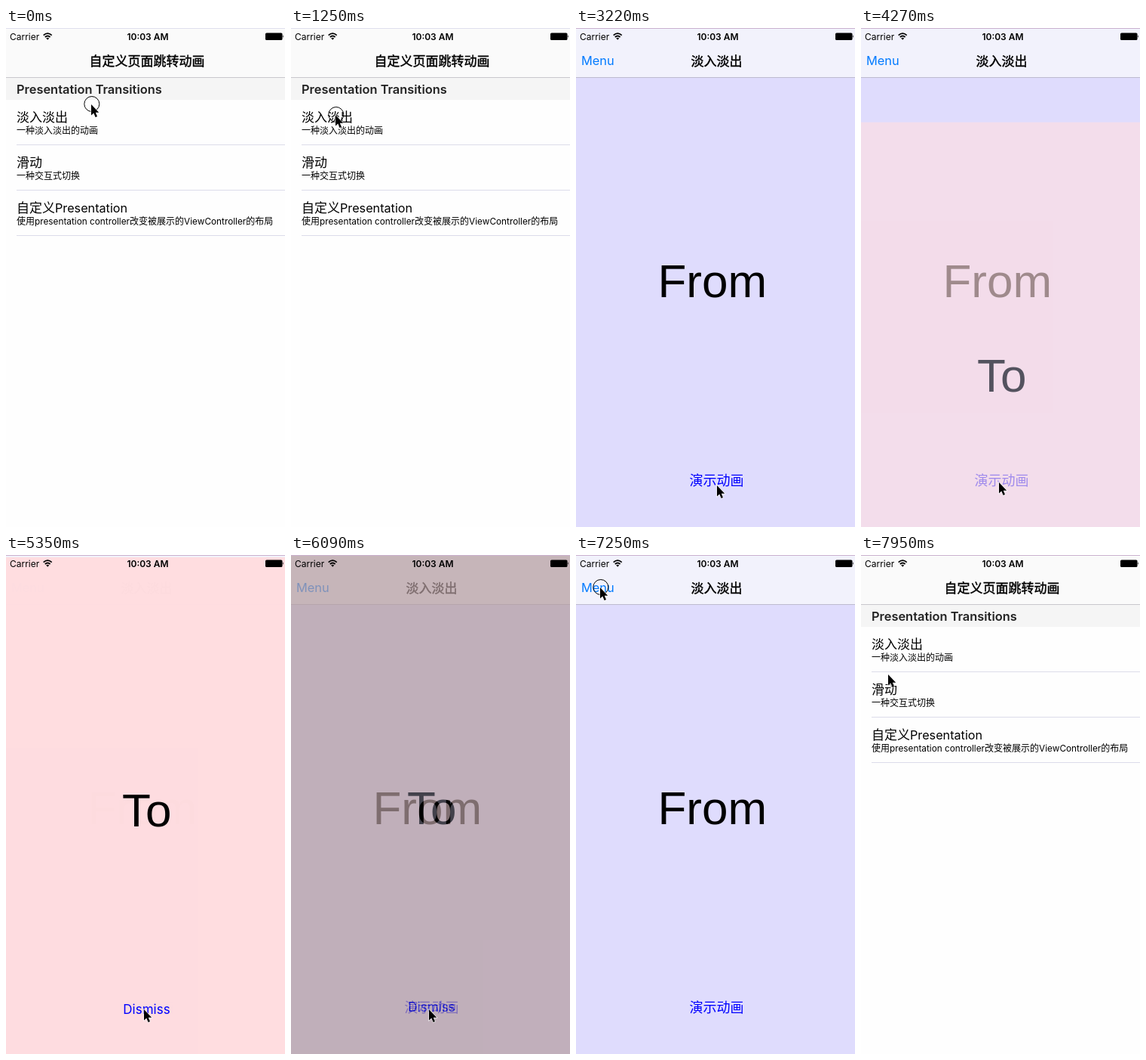
Write an HTML page that moves like this. It is 370 by 660 pixels and loops after 8000 ms.

```html
<!DOCTYPE html>
<html lang="zh-CN">
<head>
<meta charset="utf-8">
<title>自定义页面跳转动画</title>
<style>
  html, body { margin: 0; width: 100%; height: 100%; overflow: hidden; background: #fefefe; }
  svg { display: block; width: 100vw; height: 100vh; }
  text { font-family: Inter, "Noto Sans CJK SC", "Noto Sans CJK", sans-serif; white-space: pre; }
  .title { font-size: 17px; text-anchor: middle; stroke: #000; stroke-width: .45px; }
  .head { font-size: 16.4px; font-weight: 600; fill: #222; }
  .row { font-size: 17px; }
  .row tspan { font-size: 16.2px; }
  .sub { font-size: 12px; }
  .sub tspan { font-size: 11.8px; }
  .bar { font-size: 12px; }
  .menu { font-size: 16.4px; fill: #007aff; }
  .big { font: 62px "Liberation Sans", Arial, sans-serif; }
  .link { fill: #00f; text-anchor: middle; }
</style>
</head>
<body>
<svg viewBox="0 0 370 660" preserveAspectRatio="none">
  <g id="list">
    <rect width="370" height="660" fill="#fefefe"/>
    <rect width="370" height="65" fill="#fafafa"/>
    <rect y="65" width="370" height="30" fill="#f5f5f5"/>
    <rect y="65" width="370" height="1" fill="#c8c7cc"/>
    <text class="title" x="187" y="49.5">自定义页面跳转动画</text>
    <text class="head" x="14" y="87">Presentation Transitions</text>
    <text class="row" x="14" y="124">淡入淡出</text>
    <text class="sub" x="14" y="140">一种淡入淡出的动画</text>
    <text class="row" x="14" y="184">滑动</text>
    <text class="sub" x="14" y="200">一种交互式切换</text>
    <text class="row" x="14" y="244">自定义<tspan>Presentation</tspan></text>
    <text class="sub" x="14" y="260">使用<tspan>presentation controller</tspan>改变被展示的<tspan>ViewController</tspan>的布局</text>
    <path d="M14 154.5H370M14 214.5H370M14 274.5H370" stroke="#dcdcea"/>
  </g>
  <rect id="backdrop" width="370" height="660"/>
  <g id="from">
    <rect width="370" height="660" fill="#dfdcfd"/>
    <rect width="370" height="65" fill="#f2f2fc"/>
    <rect y="65" width="370" height="1" fill="#bdbbcf"/>
    <text class="menu" x="7" y="49">Menu</text>
    <text class="title" x="186.5" y="49.5">淡入淡出</text>
    <text class="big" x="108.5" y="356">From</text>
    <text class="link" x="186.5" y="604.5" font-size="18">演示动画</text>
  </g>
  <g id="to">
    <rect width="370" height="660" fill="#ffdde0"/>
    <text class="big" x="154" y="356">To</text>
    <text class="link" x="186.5" y="604" font-size="17">Dismiss</text>
  </g>
  <g id="status">
    <rect id="edge" width="370" height="1"/>
    <text class="bar" x="5" y="15.5">Carrier</text>
    <g fill="none" stroke="#000" stroke-width="1.8">
      <path d="M49.7 9.6Q55.2 4.7 60.7 9.6M51.8 12Q55.2 9 58.6 12"/>
    </g>
    <path d="M53.2 13.6Q55.2 12 57.2 13.6L55.2 15.8Z"/>
    <text class="bar" x="188" y="15.5" text-anchor="middle" font-weight="600">10:03 AM</text>
    <rect x="344" y="6.5" width="22.5" height="9.5" rx="1.6"/>
    <path d="M367.2 9.2Q369 11.2 367.2 13.2Z"/>
  </g>
  <g id="cursor">
    <circle id="ring" cx=".8" cy="-.5" r="10" fill="none" stroke="#000"/>
    <path d="M0 0V14.6L3.3 11.5L5.6 17L8 16L5.8 10.8H10.2Z" stroke="#fff" stroke-width="1.2" paint-order="stroke"/>
  </g>
</svg>
<script>
const LOOP = 8000, HEIGHT = 660;
const OPEN = 1600, PRESENT = 3990, DISMISS = 5965, FADE = 350, CLOSE = 7290;

// Pointer path: time, x, y
const path = [
  [0, 113, 101], [50, 113, 101], [450, 90, 72], [830, 58, 79], [1250, 59, 115],
  [2310, 59, 115], [2360, 107, 166], [2470, 264, 575], [2680, 264, 575],
  [3220, 187, 605], [3510, 183, 601], [6380, 183, 601], [6430, 155, 474],
  [6550, 85, 119], [6730, 85, 119], [7070, 32, 43], [7780, 32, 43], [7950, 36, 158],
];
const clicks = [[0, 60], [1240, 1310], [3930, 3990], [5880, 5960], [7250, 7310]];

const el = id => document.getElementById(id);
const [backdrop, from, to, edge, cursor, ring] =
  ["backdrop", "from", "to", "edge", "cursor", "ring"].map(el);

const show = (node, on) => node.style.display = on ? "" : "none";
const move = (node, x, y) => node.setAttribute("transform", `translate(${x} ${y})`);

// Both springs return the distance still to go, from 1 to 0
const settle = (ms, rate) => {
  const x = Math.max(0, ms) / 1000 * rate;
  return Math.exp(-x) * (1 + x);
};
const bounce = ms => {
  const s = Math.max(0, ms) / 1000;
  return s >= 2 ? 0 : Math.exp(-3.45 * s) * (Math.cos(4.6 * s) + .75 * Math.sin(4.6 * s));
};
const ease = p => p * p * (3 - 2 * p);

function pointer(t) {
  const i = path.findIndex(k => k[0] > t);
  if (i < 0) return path[path.length - 1].slice(1);
  const [t0, x0, y0] = path[i - 1], [t1, x1, y1] = path[i];
  const p = (t - t0) / (t1 - t0);
  return [x0 + (x1 - x0) * p, y0 + (y1 - y0) * p];
}

function draw(t) {
  const fading = t >= DISMISS && t < DISMISS + FADE;
  const mix = fading ? ease((t - DISMISS) / FADE) : 1;

  const open = t >= OPEN && t < CLOSE + 350;
  const shift = t < CLOSE ? settle(t - OPEN, 10.7) : 1 - settle(t - CLOSE, 18);
  show(from, open);
  move(from, 0, HEIGHT * shift);
  from.style.opacity = mix;
  show(backdrop, fading);

  const left = bounce(t - PRESENT);
  show(to, t >= PRESENT && t < DISMISS + FADE);
  move(to, 0, fading ? 0 : HEIGHT / 2 * left);
  to.style.opacity = fading ? 1 - mix : Math.min(1, 1 - left);
  // The incoming screen is always on top
  if (fading) to.after(from); else from.after(to);

  edge.setAttribute("fill", t < OPEN ? "#e0e0ee" : "#cbb2cf");
  move(cursor, ...pointer(t));
  show(ring, clicks.some(([a, b]) => t >= a && t < b));
}

const start = performance.now();
function tick() {
  draw((performance.now() - start) % LOOP);
  requestAnimationFrame(tick);
}
tick();
</script>
</body>
</html>
```
